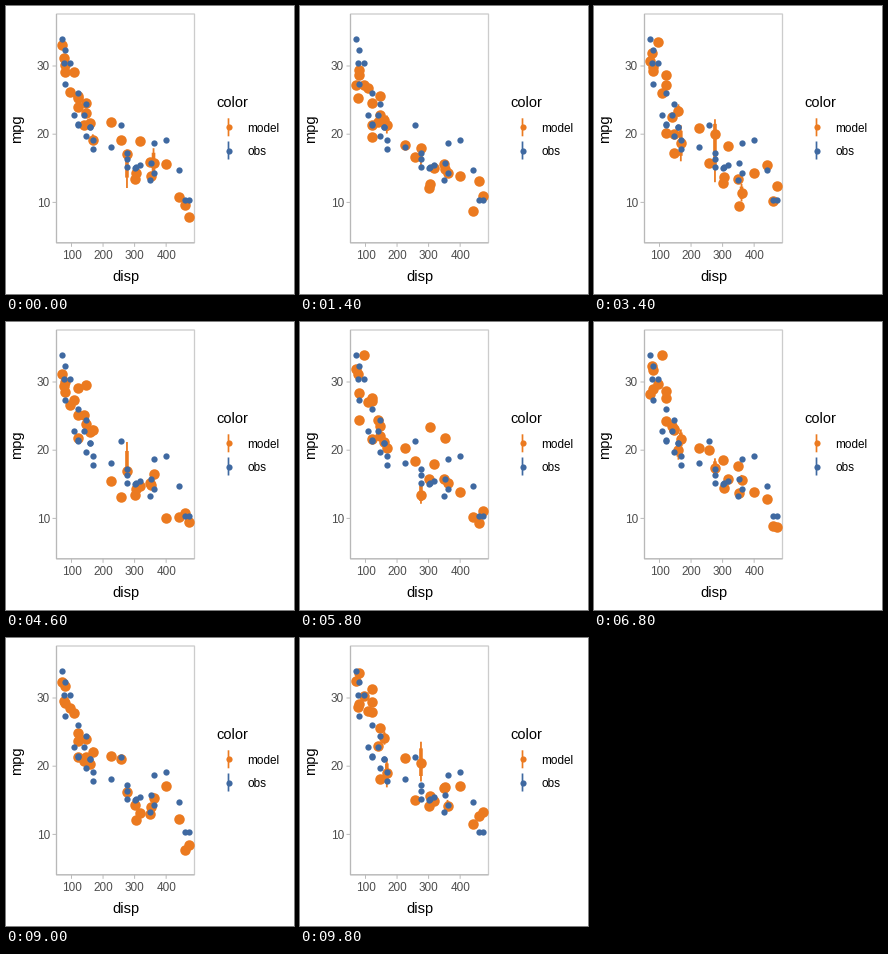
Animation, 288 px wide and 288 px high, one loop 10 s. Source, as a matplotlib script:

```python
import numpy as np
import matplotlib
import matplotlib.pyplot as plt
from matplotlib.animation import FuncAnimation
from matplotlib.collections import LineCollection
from matplotlib.patches import Rectangle

matplotlib.rcParams["font.family"] = "Liberation Sans"
matplotlib.rcParams["path.snap"] = False

SIZE, FRAMES, STEP = 288, 50, 200
ORANGE, BLUE = "#EB7A20", "#3F69A1"
LEFT, TOP, RIGHT, BOTTOM = 50.5, 8, 188.5, 236.8
TITLE, LABEL = 14.67, 11.73
NOISE = 2.5

# mtcars: displacement and fuel economy of each car
CARS = np.array([
    (160, 21), (160, 21), (108, 22.8), (258, 21.4), (360, 18.7), (225, 18.1),
    (360, 14.3), (146.7, 24.4), (140.8, 22.8), (167.6, 19.2), (167.6, 17.8),
    (275.8, 16.4), (275.8, 17.3), (275.8, 15.2), (472, 10.4), (460, 10.4),
    (440, 14.7), (78.7, 32.4), (75.7, 30.4), (71.1, 33.9), (120.1, 21.5),
    (318, 15.5), (304, 15.2), (350, 13.3), (400, 19.2), (79, 27.3),
    (120.3, 26), (95.1, 30.4), (351, 15.8), (145, 19.7), (301, 15), (121, 21.4),
])
DISP, MPG = CARS.T
ENGINES = np.unique(DISP)
TREND = np.interp(DISP, [71, 110, 150, 230, 300, 360, 472],
                  [30.5, 27.3, 21.8, 20.8, 16, 14.8, 11])


def px(disp):
    return 65.5 + (disp - 100) * 0.3155


def py(mpg):
    return 60 + (30 - mpg) * 6.82


def predict(n):
    """Quantiles of one random prediction per car, grouped by engine."""
    noise = np.random.default_rng(n).normal(0, NOISE, len(CARS))
    mpg = np.clip(TREND + noise, 5.6, 36.2)
    levels = [0.025, 0.17, 0.5, 0.83, 0.975]
    return np.array([np.quantile(mpg[DISP == d], levels) for d in ENGINES]).T


def bars(low, high):
    return [[(x, a), (x, b)] for x, a, b in zip(px(ENGINES), py(low), py(high))]


def line(xs, ys, color, width):
    ax.plot(xs, ys, color=color, lw=width, solid_capstyle="butt")


def dots(x, y, size, color, z):
    return ax.scatter(x, y, s=size ** 2, color=color, lw=0, zorder=z)


fig = plt.figure(figsize=(SIZE / 72, SIZE / 72), dpi=72, facecolor="white")
ax = fig.add_axes([0, 0, 1, 1])
ax.set_xlim(0, SIZE)
ax.set_ylim(SIZE, 0)
ax.axis("off")

# Panel, ticks and axis titles
ax.add_patch(Rectangle((LEFT, TOP), RIGHT - LEFT, BOTTOM - TOP,
                       fill=False, ec="#CCCCCC", lw=1.3))
line([LEFT, LEFT, RIGHT], [TOP, BOTTOM, BOTTOM], "#B8B8B8", 1.1)
for v in (100, 200, 300, 400):
    line([px(v)] * 2, [BOTTOM, BOTTOM + 4], "#BBBBBB", 1)
    ax.text(px(v), 253, str(v), size=LABEL, color="#4D4D4D", ha="center")
for v in (10, 20, 30):
    line([LEFT - 4, LEFT], [py(v)] * 2, "#BBBBBB", 1)
    ax.text(43.8, py(v) + 4.2, str(v), size=LABEL, color="#4D4D4D", ha="right")
ax.text((LEFT + RIGHT) / 2, 275, "disp", size=TITLE, ha="center")
ax.text(15.5, (TOP + BOTTOM) / 2, "mpg", size=TITLE, rotation=90,
        ha="center", va="baseline", rotation_mode="anchor")

# Legend
ax.text(210.5, 101, "color", size=TITLE)
for y, name, tone in ((121.3, "model", ORANGE), (144.5, "obs", BLUE)):
    line([222.5, 222.5], [y - 9, y + 9], tone, 1.7)
    dots([222.5], [y], 6.2, tone, 3)
    ax.text(241, y + 4.3, name, size=LABEL)

thin = LineCollection([], colors=ORANGE, linewidths=1.8, zorder=4)
thick = LineCollection([], colors=ORANGE, linewidths=3.6, zorder=4)
for part in (thin, thick):
    part.set_capstyle("butt")
    ax.add_collection(part)
model = dots(px(ENGINES), py(0 * ENGINES), 10.5, ORANGE, 5)
dots(px(DISP), py(MPG), 6.3, BLUE, 6)


def update(n):
    low, lower, mid, upper, high = predict(n)
    model.set_offsets(np.column_stack([px(ENGINES), py(mid)]))
    thin.set_segments(bars(low, high))
    thick.set_segments(bars(lower, upper))
    return model, thin, thick


anim = FuncAnimation(fig, update, frames=FRAMES, interval=STEP,
                     repeat=True, repeat_delay=0, blit=False)
plt.show()
```
